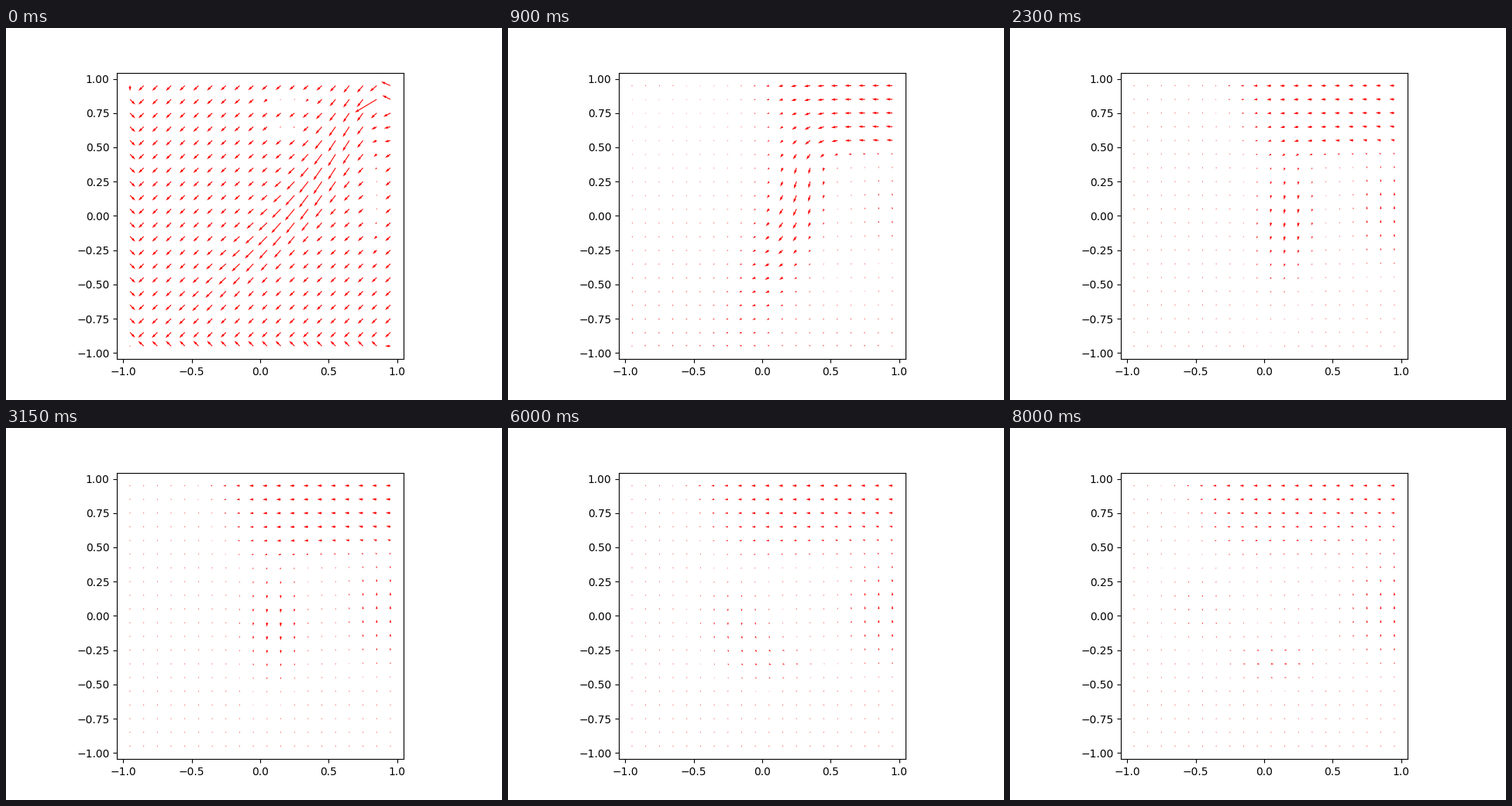
Recreate the animation shown at these times as a matplotlib script. Size 640 by 480 pixels, loop 8050 ms.

```python
import numpy as np
import matplotlib.pyplot as plt
from matplotlib.animation import FuncAnimation

FRAMES, STEP = 161, 50

grid = np.linspace(-.95, .95, 20)
X, Y = np.meshgrid(grid, grid)


def bell(z, w):
    return np.exp(-(z / w) ** 2)


def spot(x, y, wx, wy):
    return bell(X - x, wx) * bell(Y - y, wy)


def ramp(z, w):
    return .5 + .5 * np.tanh(z / (2 * w))


def drift(n):
    """Uniform diagonal drift, mirrored at the left and bottom walls."""
    fade, fresh = min(n / 6, 1), max(1 - n / 6, 0)
    k = 1 - fade * (.35 * Y + .75 * ramp(X - .35, .1) * ramp(Y + .5, .12))
    for calm in [(.85, .15, .06, .33), (.22, .85, .16, .05), (.2, .65, .1, .05)]:
        k = k * (1 - fresh * spot(*calm))
    u = -6.8 / (1 + n / 3.7) * k
    v = u * (1 - fresh * (.2 * ramp(X + .2, .2) * ramp(Y, .3) + .9 * spot(.9, .6, .1, .12)))
    u[:, 0] *= -1
    v[0] *= -1
    u[0, 0] = v[0, 0] = v[0, -1] = u[-1, 0] = 0
    return u, v


def stream(n, s):
    """Leftward flow along the top, spreading from the right wall."""
    front = 1.02 - 1.57 * s + .4 * (.95 - Y)
    edge = .49 + .08 * s ** 6 + .1 * (X - 1)
    speed = 4.7 + 102 / (n + 8)
    return -speed * ramp(X - front, .08 + .06 * s) * ramp(Y - edge, .025 + .1 * s ** 6)


def jet(s):
    """Descending jet around a curved axis that straightens and drifts left."""
    axis = .25 - .7 * s ** 8 + (.8 - s) * Y - .35 * (1 - s) * Y ** 2
    width = .2 + .25 * s ** 8
    mid = min(.3 + .2 * s, .76 - s) + .3 * s ** 16
    down = min(10.5 + 4 * s, 18 - 15.7 * s)
    side = 5.5 * ramp(.68 - s, .05)
    u = -side * bell(X - axis + .06, width) * bell(Y - .05 + .5 * s, .6)
    v = -down * bell(X - axis, width) * bell(Y - mid, .65 - .28 * s)
    return u, v


def field(n):
    """Arrow components in pixels."""
    s = np.log1p(n) / np.log(FRAMES)  # the flow slows down logarithmically
    u, v = np.add(drift(n), jet(s))
    u += stream(n, s)

    # return flow: right along the bottom, up the right side
    u += 3.8 * ramp(s - .88, .04) * spot(.08, -.33, .42, .22)
    v += 4.6 * ramp(s - .52, .08) * ramp(X - .85 + .28 * s, .05 + .1 * s ** 6) * bell(Y - .03, .5)

    # brief gust in the top right corner
    gust = np.exp(-n / 1.5)
    u -= 20 * gust * spot(.85, .85, .04, .04)
    v += gust * (17 * spot(.95, .9, .04, .08) - 9 * spot(.85, .85, .04, .04))
    return u, v


fig, ax = plt.subplots(figsize=(6.4, 4.8), dpi=100)
ax.set_aspect("equal")
arrows = ax.quiver(X, Y, *field(0), color="red", scale=1, scale_units="dots")
ax.set(xlim=(-1.045, 1.045), ylim=(-1.045, 1.045),
       xticks=np.linspace(-1, 1, 5), yticks=np.linspace(-1, 1, 9))


def update(n):
    arrows.set_UVC(*field(n))
    return arrows,


anim = FuncAnimation(fig, update, frames=FRAMES, interval=STEP, repeat=True, repeat_delay=0)
plt.show()
```
